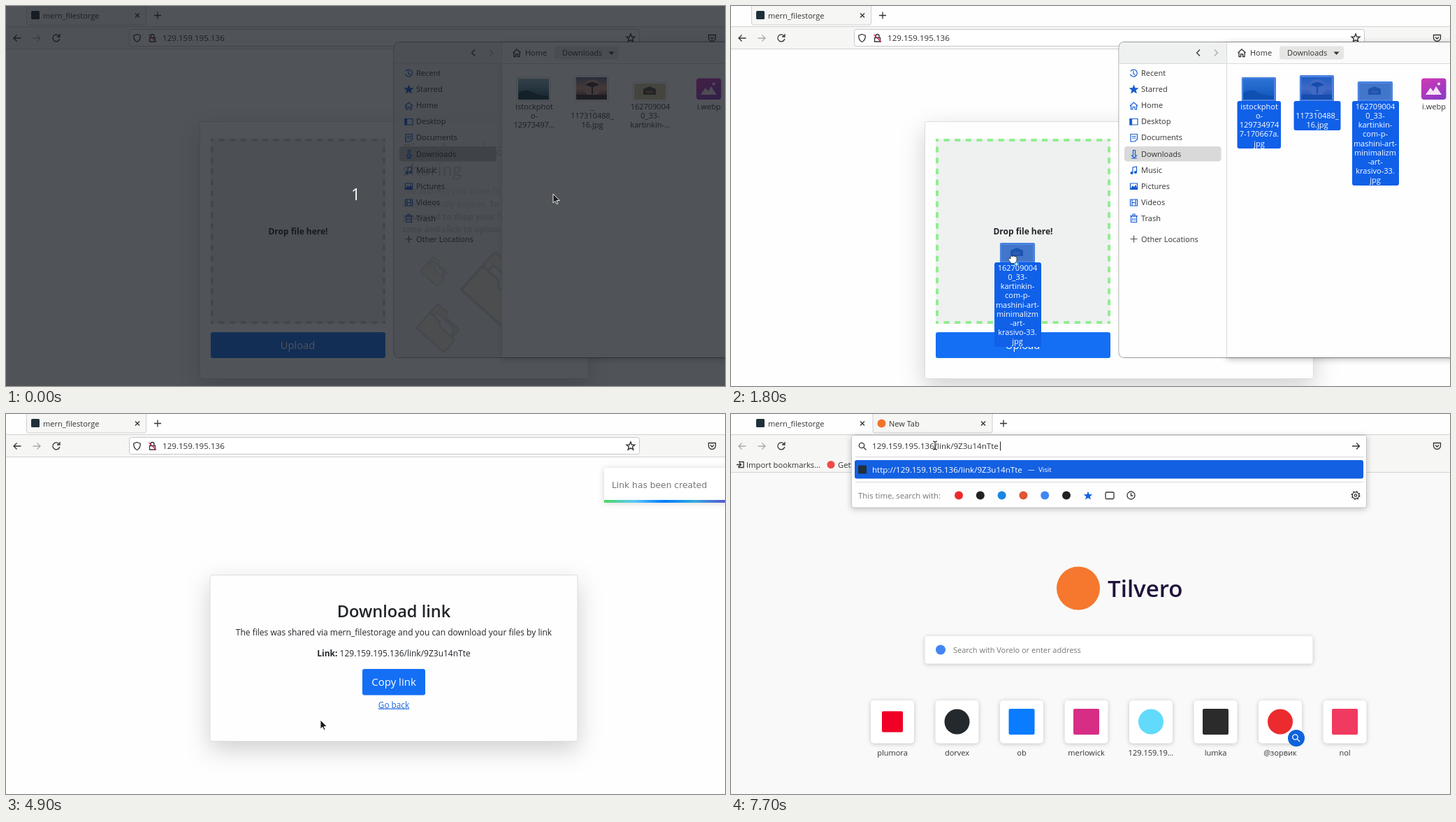
These frames come from a looping animation (1029 px wide and 544 px high, 8000 ms). An HTML page:

```html
<!DOCTYPE html>
<html lang="en">
<head>
<meta charset="utf-8">
<title>File sharing demo</title>
<style>
html, body { margin: 0; width: 100%; height: 100%; overflow: hidden; background: #fefefe; }
svg { display: block; width: 1029px; height: 544px; font: 11px "Open Sans", "Noto Sans", sans-serif; fill: #333; }
text { white-space: pre; }
.m { text-anchor: middle; }
.b { font-weight: 700; }
.w { fill: #fff; }
.body { font-size: 12px; fill: #212529; }
.h { font-size: 23.6px; font-weight: 600; fill: #212529; }
.url { font-size: 11.6px; }
.line { fill: none; stroke: #333; stroke-width: 1.3; }
.pale { stroke: #aaa; }
.blue { fill: none; stroke: #1a5fd0; stroke-width: 1.2; }
.card { fill: #fefefe; stroke: #dcdcdc; filter: drop-shadow(0 12px 17px rgba(0,0,0,.18)); }
.item { fill: #fff; filter: drop-shadow(0 3px 4px rgba(0,0,0,.15)); }
.tile { fill: #fff; filter: drop-shadow(0 1px 3px rgba(0,0,0,.22)); }
.pick { fill: #1060e8; }
.tint { fill: #0a58dc; opacity: .72; }

/* 1.25% is one 100 ms step */
.k { animation: 8s step-end infinite; }
#dim { animation-name: dim; }
@keyframes dim { 0% { opacity: 1 } 1.25% { opacity: .45 } 2.5% { opacity: 0 } }
#s1 { animation-name: s1; }
@keyframes s1 { 0% { opacity: 0 } 7.5% { opacity: 1 } }
#s2 { animation-name: s2; }
@keyframes s2 { 0% { opacity: 0 } 10% { opacity: 1 } }
#s3 { animation-name: s3; }
@keyframes s3 { 0% { opacity: 0 } 13.75% { opacity: 1 } }
#side { animation-name: side; }
@keyframes side { 0% { fill: rgba(234,237,237,.86) } 17.5% { fill: #fefefe } }
#row { animation-name: row; }
@keyframes row { 0% { fill: #bcbebd } 17.5% { fill: #d8d9d8 } }
#dash { animation-name: dash; }
@keyframes dash { 0% { stroke: #ccc } 21.25% { stroke: #90ee90 } 30% { stroke: #ccc } }
#hint { animation-name: hint; }
@keyframes hint { 0% { opacity: 1 } 30% { opacity: 0 } }
#list { animation-name: list; }
@keyframes list { 0% { opacity: 0 } 30% { opacity: 1 } }
#send { animation-name: send; }
@keyframes send { 0% { fill: #146ff4 } 37.5% { fill: #1060d2 } }
#win { animation-name: win; }
@keyframes win { 0% { opacity: 1 } 47.5% { opacity: 0 } }
#home { animation-name: home; }
@keyframes home { 0% { opacity: 1 } 50% { opacity: 0 } }
#load { animation-name: load; }
@keyframes load { 0% { opacity: 0 } 50% { opacity: 1 } 56.25% { opacity: 0 } }
#spin { animation-name: spin; }
@keyframes spin { 0% { transform: rotate(-48deg) } 51.25% { transform: rotate(0) } 52.5% { transform: rotate(48deg) } 53.75% { transform: rotate(96deg) } }
#done { animation-name: done; }
@keyframes done { 0% { opacity: 0 } 56.25% { opacity: 1 } }
#copy { animation-name: copy; }
@keyframes copy { 0% { fill: #146ff4 } 63.75% { fill: #1059c9 } }
#ring { animation-name: ring; }
@keyframes ring { 0% { opacity: 0 } 70% { opacity: 1 } }
#toast { animation-name: toast; }
@keyframes toast {
  0% { transform: translateX(300px) } 57.5% { transform: translateX(170px) }
  58.75% { transform: translateX(60px) } 60% { transform: translateX(-18px) }
  61.25% { transform: translateX(0) } 62.5% { transform: translateX(6px) }
  63.75% { transform: translateX(-3px) } 65% { transform: none }
}
#bar { animation: bar 8s infinite; }
@keyframes bar {
  0%, 56.25% { transform: scaleX(.95); animation-timing-function: steps(35) }
  100% { transform: scaleX(.25) }
}
#fresh { animation-name: fresh; }
@keyframes fresh { 0% { opacity: 0 } 81.25% { opacity: 1 } }
#tiles { animation-name: tiles; }
@keyframes tiles { 0% { opacity: 0 } 82.5% { opacity: 1 } }
#drop { animation-name: drop; }
@keyframes drop { 0% { opacity: 0 } 90% { opacity: 1 } }

#arrow { animation-name: arrow; }
@keyframes arrow {
  0% { opacity: 1 } 17.5% { opacity: 0 } 30% { opacity: 1 } 37.5% { opacity: 0 }
  50% { opacity: 1 } 63.75% { opacity: 0 } 75% { opacity: 1 } 85% { opacity: 0 }
}
#hand { animation-name: hand; }
@keyframes hand { 0% { opacity: 0 } 37.5% { opacity: 1 } 50% { opacity: 0 } 63.75% { opacity: 1 } 75% { opacity: 0 } }
#grab { animation-name: grab; }
@keyframes grab { 0% { opacity: 0 } 17.5% { opacity: 1 } 30% { opacity: 0 } }
#beam { animation-name: beam; }
@keyframes beam { 0% { opacity: 0 } 85% { opacity: 1 } }
#mouse { animation-name: mouse; }
@keyframes mouse {
  0% { transform: translate(783px,269px) }
  5% { transform: translate(776px,235px) }
  6.25% { transform: translate(764px,180px) }
  7.5% { transform: translate(757px,134px) }
  8.75% { transform: translate(790px,128px) }
  10% { transform: translate(832px,124px) }
  11.25% { transform: translate(848px,125px) }
  12.5% { transform: translate(890px,128px) }
  13.75% { transform: translate(915px,131px) }
  17.5% { transform: translate(880px,150px) }
  18.75% { transform: translate(760px,215px) }
  20% { transform: translate(620px,285px) }
  21.25% { transform: translate(480px,345px) }
  22.5% { transform: translate(403px,362px) }
  31.25% { transform: translate(420px,385px) }
  32.5% { transform: translate(480px,430px) }
  33.75% { transform: translate(570px,485px) }
  35% { transform: translate(625px,507px) }
  36.25% { transform: translate(590px,502px) }
  37.5% { transform: translate(520px,497px) }
  38.75% { transform: translate(450px,494px) }
  40% { transform: translate(414px,493px) }
  42.5% { transform: translate(343px,493px) }
  57.5% { transform: translate(350px,490px) }
  58.75% { transform: translate(375px,478px) }
  60% { transform: translate(410px,460px) }
  61.25% { transform: translate(450px,438px) }
  62.5% { transform: translate(490px,415px) }
  63.75% { transform: translate(520px,398px) }
  65% { transform: translate(538px,390px) }
  66.25% { transform: translate(545px,386px) }
  67.5% { transform: translate(550px,382px) }
  75% { transform: translate(470px,310px) }
  76.25% { transform: translate(370px,210px) }
  77.5% { transform: translate(288px,122px) }
  78.75% { transform: translate(225px,30px) }
  80% { transform: translate(217px,15px) }
  83.75% { transform: translate(222px,22px) }
  85% { transform: translate(235px,34px) }
  86.25% { transform: translate(247px,42px) }
  87.5% { transform: translate(255px,46px) }
  96.25% { transform: translate(292px,45px) }
}
</style>
</head>
<body>
<svg viewBox="0 0 1029 544">
<defs>
  <linearGradient id="rainbow">
    <stop stop-color="#4cd964"/><stop offset=".2" stop-color="#5ac8fa"/><stop offset=".4" stop-color="#007aff"/>
    <stop offset=".6" stop-color="#34aadc"/><stop offset=".8" stop-color="#5856d6"/><stop offset="1" stop-color="#ff2d55"/>
  </linearGradient>
  <linearGradient id="sea" x2="0" y2="1"><stop stop-color="#8fb6c6"/><stop offset=".45" stop-color="#5d8fa0"/><stop offset="1" stop-color="#1f4a5c"/></linearGradient>
  <linearGradient id="dusk" x2="0" y2="1"><stop stop-color="#5d6d88"/><stop offset=".5" stop-color="#d59a86"/><stop offset="1" stop-color="#35303c"/></linearGradient>
  <linearGradient id="pink" x2=".6" y2="1"><stop stop-color="#d338b4"/><stop offset="1" stop-color="#8e3cc4"/></linearGradient>
  <g id="t1"><path fill="#fff" stroke="#bbb" stroke-width=".6" d="M731 102h48v34h-48z"/><path fill="url(#sea)" d="M733 104h44v30h-44z"/><path fill="#1e3f4a" d="M733 124q12-6 20-1t24 6v5h-44z"/></g>
  <g id="t2"><path fill="#fff" stroke="#bbb" stroke-width=".6" d="M814 100h48v36h-48z"/><path fill="url(#dusk)" d="M816 102h44v32h-44z"/><circle cx="839" cy="117" r="12" fill="#c9978a"/><path fill="#3c3038" d="M829 113q10-8 20 0l-9 3v10h-2v-10zM816 127h44v7h-44z"/></g>
  <g id="t3"><path fill="#fff" stroke="#ccc" stroke-width=".6" d="M897 109h49v27h-49z"/><path fill="#d3c7a0" d="M899 111h45v23h-45z"/><path fill="#4a4a44" d="M912 119l9-4 9 4v8h-18z"/><path fill="#a0603c" d="M916 121h10v4h-10z"/></g>
  <g id="p3">
    <use href="#t3"/><rect class="tint" x="897" y="108" width="50" height="29" rx="2"/>
    <rect class="pick" x="889" y="136" width="67" height="121" rx="3"/>
    <text class="m w" x="922" y="148" data-lines="162709004|0_33-|kartinkin-|com-p-|mashini-art-|minimalizm|-art-|krasivo-33.|jpg"/>
  </g>
  <g id="folder" stroke="#2b2b2b" stroke-width="1.3" stroke-linejoin="round">
    <path fill="#f2a93b" d="M1 28V3q0-2 2-2h8l3 4h13q2 0 2 2v21z"/>
    <path fill="#fff" d="M5 13V7h19l3 4v4z"/>
    <path fill="#fcd061" d="M1 28V13q0-2 2-2h9l3 3h14q3 0 3 2v10q0 2-2 2z"/>
  </g>
  <g id="reload"><path class="line" d="M76 43a5 5 0 1 0 .8 4M77 40v4h-4"/></g>
  <g id="pocket"><path class="line" d="M1005.500 41.500h10v4a5 5 0 0 1-10 0zM1008 44.500l2.500 2.500 2.500-2.500"/></g>
  <g id="x"><path class="line" stroke-width="1" d="M-3-3 3 3M3-3-3 3"/></g>
  <g id="plus"><path class="line" stroke-width="1" d="M-5 0H5M0-5V5"/></g>
  <g id="lens"><circle class="line" cx="-1" cy="-1" r="3.700"/><path class="line" d="M2 2 5.500 5.500"/></g>
  <path id="star" d="M0-5.500 1.500-1.800 5.400-1.600 2.400.9 3.400 4.700 0 2.500-3.400 4.700-2.400.9-5.400-1.600-1.500-1.800Z"/>
  <rect id="fav" x="-6" y="-6" width="12" height="12" rx="1.500" fill="#20303a"/>
</defs>

<path fill="#fefefe" d="M0 0h1029v544H0z"/>

<g id="home" class="k">
  <rect class="card" x="277.500" y="165.500" width="556" height="368" rx="3"/>
  <text class="h" x="567" y="214" data-lines="Simple, private file|sharing" data-step="29"/>
  <g class="body">
    <text x="567" y="269">The app lets you share files with a link that</text>
    <text x="567" y="287.500">automatically expires. <tspan class="b">To upload files</tspan></text>
    <text class="b" x="567" y="305.500" data-lines="you need to drop your files to the drop|zone and click to upload button" data-step="18.500"/>
  </g>
  <use href="#folder" transform="translate(612 357) rotate(42) scale(1.050)"/>
  <use href="#folder" transform="translate(700 348) rotate(42) scale(2.700)"/>
  <use href="#folder" transform="translate(618 424) rotate(42) scale(1.700)"/>
  <rect x="293" y="190" width="250" height="265" rx="4" fill="#eff1f0"/>
  <path id="dash" class="k" fill="none" stroke-width="4" stroke-dasharray="8 7.610" stroke-dashoffset="4" d="M293 192H543M293 453H543M295 190V455M541 190V455"/>
  <text id="hint" class="k body m b" x="418" y="326.500">Drop file here!</text>
  <g id="list" class="k body">
    <rect class="item" x="308" y="206" width="219" height="67.500" rx="3"/>
    <rect class="item" x="308" y="280" width="219" height="49" rx="3"/>
    <rect class="item" x="308" y="335" width="219" height="86.500" rx="3"/>
    <use href="#folder" x="317" y="225"/><use href="#folder" x="317" y="290"/><use href="#folder" x="317" y="364"/>
    <text x="351" y="225.500" data-lines="istockphoto-|1297349747-170667a.jpg" data-step="18.500"/>
    <text class="b" x="351" y="262.500">119735 bytes</text>
    <text x="351" y="299.500">_117310488_16.jpg</text>
    <text class="b" x="351" y="318">116165 bytes</text>
    <text x="351" y="355" data-lines="1627090040_33-kartinkin-|com-p-mashini-art-|minimalizm-art-krasivo-33.jpg" data-step="18.500"/>
    <text class="b" x="351" y="410.500">127760 bytes</text>
  </g>
  <rect id="send" class="k" x="293" y="467" width="250" height="37" rx="3"/>
  <text class="m w" x="417.500" y="491" font-size="14.700">Upload</text>
</g>

<g id="load" class="k">
  <g transform="translate(554.500 350)"><path id="spin" class="k" fill="none" stroke="#2b2d30" stroke-width="3" d="M7.800-7.800A11 11 0 1 0 7.800 7.800"/></g>
</g>

<g id="done" class="k">
  <rect class="card" x="292" y="230.500" width="526" height="238" rx="3"/>
  <text class="h m" x="555" y="291">Download link</text>
  <text class="body m" x="555" y="316.500">The files was shared via mern_filestorage and you can download your files by link</text>
  <text class="body m" x="555" y="347"><tspan class="b">Link:</tspan> 129.159.195.136/link/9Z3u14nTte</text>
  <rect id="ring" class="k" x="507" y="362" width="96" height="43.500" rx="5" fill="#b6d4fb"/>
  <rect id="copy" class="k" x="510" y="365" width="90" height="37.500" rx="3"/>
  <text class="m w" x="555" y="389" font-size="15">Copy link</text>
  <text class="m" x="555" y="420.500" font-size="11.800" fill="#1a66dc" text-decoration="underline">Go back</text>
  <g id="toast" class="k">
    <rect x="856" y="77" width="248" height="49" fill="#fff" style="filter:drop-shadow(0 1px 4px rgba(0,0,0,.18))"/>
    <text x="867" y="106" fill="#757575" style="font:12.300px 'DejaVu Sans',sans-serif">Link has been created</text>
    <g transform="translate(856 122.500)"><rect id="bar" width="248" height="4" fill="url(#rainbow)"/></g>
  </g>
</g>

<g id="chrome">
  <path fill="#fefefe" d="M0 0h1029v30H0z"/>
  <path fill="#f6f6f5" d="M0 30h1029v31H0z"/>
  <path stroke="#d2d2d2" d="M0 29.500h1029M0 61.500h1029"/>
  <path fill="#f6f6f5" stroke="#c4c4c4" stroke-width=".8" d="M29.500-1h171v25q0 3-3 3h-165q-3 0-3-3z"/>
  <use href="#fav" x="42" y="13"/>
  <text x="53" y="17.500">mern_filestorge</text>
  <use href="#x" x="188" y="13.500"/><use href="#plus" x="217" y="13.500"/>
  <path class="line" d="M21.500 46H11M15.500 41.500 11 46l4.500 4.500"/>
  <path class="line pale" d="M38.500 46H49M44.500 41.500 49 46l-4.500 4.500"/>
  <use href="#reload"/><use href="#pocket"/>
  <rect x="176.500" y="33.500" width="730" height="24" rx="3" fill="#fff" stroke="#c8c8c8"/>
  <path class="line" d="M187.500 40.500l4.700 1.700q.6 6.500-4.700 9.300-5.300-2.800-4.700-9.300z"/>
  <path class="line" d="M205.500 45.500h8v5.500h-8zM207 45v-2a2.500 2.500 0 0 1 5 0v2"/>
  <path stroke="#d6204e" stroke-width="1.300" d="M204.500 41l10.500 10.500"/>
  <text class="url" x="224" y="50">129.159.195.136</text>
  <use href="#star" class="line" transform="translate(894 46) scale(1.100)"/>
</g>

<g id="win" class="k">
  <path fill="none" stroke="#9a9a9a" d="M1040 51.500H563q-8 0-8 8v436q0 8 8 8h477" />
  <path fill="#fefefe" d="M709.500 52H1040v451H709.500z" style="filter:drop-shadow(0 2px 5px rgba(0,0,0,.3))"/>
  <path id="side" class="k" d="M555.500 82H709.500V503H563q-7.500 0-7.500-8z"/>
  <path fill="#eff0f0" d="M709.500 52H563q-7.500 0-7.500 8v22h154z"/>
  <path fill="#fbfbfb" d="M710 52h330v30H710z"/>
  <path stroke="#d9d9d9" d="M555 82.500h474M709.500 52v451"/>
  <path class="line" d="M671 62.500l-4.500 4.500 4.500 4.500"/><path class="line pale" d="M692 62.500l4.500 4.500-4.500 4.500"/>
  <path class="line" d="M725.500 67l5.500-5 5.500 5M727 66v6.500h2.500V69h3v3.500h2.500V66"/>
  <text x="743" y="71">Home</text>
  <rect x="785" y="57.500" width="92" height="19" rx="4" fill="#e5e5e4"/>
  <text x="796" y="71">Downloads</text><path d="M862.500 65.500h8l-4 4.500z"/>
  <rect id="row" class="k" x="563" y="201" width="138.500" height="21.500" rx="4"/>
  <text x="587" y="100" data-lines="Recent|Starred|Home|Desktop|Documents|Downloads|Music|Pictures|Videos|Trash" data-step="23.110"/>
  <text x="587" y="337.500">Other Locations</text>
  <g class="blue">
    <path d="M572 93.500a5 5 0 1 1-.5 4M576 93v4l2.500 1.500"/>
    <use href="#star" x="576.500" y="119.500" fill="#1a5fd0"/>
    <path d="M571 143l5.500-5 5.500 5M572.500 142v6h2.500v-3.500h3v3.500h2.500v-6"/>
    <path d="M571 161.500h11v8.500h-11z"/><path fill="#1a5fd0" d="M571 161.500h2.500v8.500H571z"/>
    <path d="M572 183.500h9.500v7l-3.500 3.500h-6zM574 186.500h5.500M574 189h5.500"/>
    <path d="M575.500 206.500v7.500h-2l3.500 3.500 3.500-3.500h-2v-7.500zM573 218h8"/>
    <path d="M575 239v-8l5.500-1v8"/><g fill="#1a5fd0"><circle cx="573.500" cy="239" r="1.500"/><circle cx="579" cy="238" r="1.500"/></g>
    <path d="M571.500 254h10v8.500h-10z"/><path fill="#1a5fd0" d="M572 262l3-4 2 2 2-3 2 5z"/>
    <path d="M571.500 277h10v9h-10zM574 277v9M579 277v9M574 281.500h5"/>
    <path d="M572.500 301h8v8.500h-8zM571 300.500h11M575 300v-2h3v2M575 303.500v4M578 303.500v4"/>
    <path stroke="#555" d="M571.500 333.500h10M576.500 328.500v10"/>
  </g>
  <use href="#t1"/><use href="#t2"/><use href="#t3"/>
  <g class="m">
    <text x="756" y="148" data-lines="istockphot|o-|12973497…"/>
    <text x="839" y="148" data-lines="_|117310488_|16.jpg"/>
    <text x="922" y="148" data-lines="162709004|0_33-|kartinkin-…"/>
    <text x="1006" y="148">i.webp</text>
  </g>
  <rect x="988" y="103.500" width="35.500" height="30.500" rx="4" fill="url(#pink)"/>
  <path fill="#f7e4f6" d="M994 127l7-10 4 5 4-7 8 12z"/><circle cx="1013" cy="111.500" r="2" fill="#f7e4f6"/>
  <g id="s1" class="k">
    <rect class="tint" x="731" y="102" width="49" height="35" rx="2"/>
    <rect class="pick" x="724.500" y="136" width="62.500" height="68" rx="3"/>
    <text class="m w" x="756" y="148" data-lines="istockphot|o-|129734974|7-170667a.|jpg"/>
  </g>
  <g id="s2" class="k">
    <rect class="tint" x="814" y="99" width="49" height="38" rx="2"/>
    <rect class="pick" x="805.500" y="136" width="67" height="42" rx="3"/>
    <text class="m w" x="839" y="148" data-lines="_|117310488_|16.jpg"/>
  </g>
  <g id="s3" class="k"><use href="#p3"/></g>
</g>

<g id="fresh" class="k">
  <path fill="#fefefe" d="M0 0h1029v30H0z"/>
  <path fill="#f6f6f5" d="M0 30h1029v53H0z"/>
  <path fill="#f8f9f8" d="M0 83h1029v461H0z"/>
  <path stroke="#d2d2d2" d="M0 29.500h1029M0 83.500h1029"/>
  <path fill="#f6f6f5" stroke="#c4c4c4" stroke-width=".8" d="M203-1h171v25q0 3-3 3h-165q-3 0-3-3z"/>
  <use href="#fav" x="42" y="13"/><text x="53" y="17.500">mern_filestorge</text>
  <circle cx="215.500" cy="13.500" r="6" fill="#f2742c"/><text x="226" y="17.500">New Tab</text>
  <use href="#x" x="188" y="13.500"/><use href="#x" x="361" y="13.500"/><use href="#plus" x="390" y="13.500"/>
  <path class="line pale" d="M21.500 46H11M15.500 41.500 11 46l4.500 4.500M38.500 46H49M44.500 41.500 49 46l-4.500 4.500"/>
  <use href="#reload"/><use href="#pocket"/>
  <path class="line" d="M11 68.500h7v8h-7v-2.500M8 72.500h6.500M12 70l2.500 2.500L12 75"/>
  <text x="22" y="76.500" font-size="11.200">Import bookmarks…</text>
  <circle cx="143" cy="72.500" r="5.500" fill="#ee4a45"/><text x="153" y="76.500" font-size="11.200">Getting Started</text>
  <rect x="176.500" y="33.500" width="730" height="24" rx="3" fill="#fff" stroke="#1a66dc"/>
  <use href="#lens" x="188" y="46"/>
  <text x="202" y="50" fill="#777">Search with Vorelo or enter address</text>
  <g id="tiles" class="k">
    <circle cx="497" cy="249.500" r="31" fill="#f5782e"/>
    <text x="539" y="261.500" font-size="33" font-weight="600" fill="#20123a">Tilvero</text>
    <rect class="tile" x="277.500" y="318" width="555" height="39.500" rx="4"/>
    <circle cx="300" cy="337.500" r="7" fill="#4285f4"/>
    <text x="318" y="341.500" fill="#777">Search with Vorelo or enter address</text>
    <g id="grid"></g>
    <circle cx="809" cy="464" r="12" fill="#0f62dc"/>
    <g style="filter:brightness(0) invert(1)"><use href="#lens" x="808.500" y="463.500"/></g>
  </g>
  <g id="drop" class="k">
    <rect x="172.500" y="30.500" width="737" height="103.500" rx="3" fill="#fefefe" stroke="#c8c8c8" style="filter:drop-shadow(0 2px 4px rgba(0,0,0,.22))"/>
    <use href="#lens" x="188" y="46"/>
    <text class="url" x="202" y="50">129.159.195.136/link/9Z3u14nTte</text>
    <path stroke="#222" d="M385.500 39.500v13"/>
    <path class="line" d="M889 46h10M895 41.500l4.500 4.500-4.500 4.500"/>
    <path stroke="#d8d8d8" d="M178 61.500h727M178 97.500h727"/>
    <rect x="177" y="66" width="728" height="26.500" rx="3" fill="#1360e2"/>
    <use href="#fav" x="188" y="79.500"/>
    <text class="url w" x="202" y="83.500">http://129.159.195.136/link/9Z3u14nTte</text>
    <text class="w" x="425" y="83" font-size="9.800">—  Visit</text>
    <text x="182" y="121" font-size="11.400" fill="#777">This time, search with:</text>
    <g id="engines"></g>
    <use href="#star" transform="translate(511 117) scale(1.150)" fill="#1360e2"/>
    <rect class="line" x="536" y="112" width="12" height="9.500" rx="1.500"/>
    <circle class="line" cx="572.500" cy="116.500" r="5.500"/><path class="line" d="M572.500 113v4h3"/>
    <circle class="line" cx="894" cy="116.500" r="4.700"/><circle class="line" cx="894" cy="116.500" r="1.700"/>
    <circle cx="894" cy="116.500" r="5.800" fill="none" stroke="#333" stroke-width="1.400" stroke-dasharray="2 2.555"/>
  </g>
</g>

<g id="dim" class="k">
  <path fill="#14181e" opacity=".74" d="M0 0h1029v544H0z"/>
  <text class="m w" x="500.500" y="277.500" font-size="23">1</text>
</g>

<g id="mouse" class="k">
  <path id="arrow" class="k" fill="#1c1c1c" stroke="#fff" stroke-width=".9" d="M0 0V13L3 10.200 5 14.600 7 13.700 5 9.500H9.300Z"/>
  <path id="hand" class="k" fill="#fff" stroke="#1c1c1c" d="M.5 0Q.5-1.500 2-1.500T3.500 0V4.500L8 5.500Q9.500 6 9.300 8L8.500 12H1L-2.600 7.500Q-3 5.500-1.300 6L.5 7.500Z"/>
  <g id="grab" class="k">
    <use href="#p3" x="-915" y="-131"/>
    <path fill="#fff" stroke="#1c1c1c" stroke-width=".8" d="M-3-3q1.500-2 3-.5 1.500-1.500 3 0 3-1 3 2v4l-2 4h-6l-3-4q-2-2.500 0-3.500l2 1z"/>
    <circle cx="5.500" cy="7.500" r="3.500" fill="#3d9be9"/><path stroke="#fff" d="M3.500 7.500h4M5.500 5.500v4"/>
  </g>
  <path id="beam" class="k" fill="none" stroke="#222" stroke-width="1.100" d="M-3-6q3 0 3 2v8q0 2-3 2M3-6q-3 0-3 2v8q0 2 3 2"/>
</g>
</svg>
<script>
const $ = id => document.getElementById(id);

// Break labels into lines at "|"
for (const el of document.querySelectorAll('[data-lines]')) {
  const step = el.dataset.step || 13.15;
  el.innerHTML = el.dataset.lines.split('|').map((s, i) =>
    `<tspan x="${el.getAttribute('x')}" dy="${i ? step : 0}">${s}</tspan>`).join('');
}

const sites = [
  ['plumora', '#f00024', 30], ['dorvex', '#24292e', 0], ['ob', '#0a7cff', 37], ['merlowick', '#d62e85', 37],
  ['129.159.19…', '#61dafb', 0], ['lumka', '#2b2b2b', 37], ['@зорвик', '#ec2b2f', 0], ['nol', '#f03a5f', 37]
];
$('grid').innerHTML = sites.map(([name, color, size], i) => {
  const x = 231 + 92.5 * i, y = 440.5;
  const mark = size
    ? `<rect x="${x - size / 2}" y="${y - size / 2}" width="${size}" height="${size}" rx="2" fill="${color}"/>`
    : `<circle cx="${x}" cy="${y}" r="18" fill="${color}"/>`;
  return `<rect class="tile" x="${x - 31}" y="410" width="62" height="61.5" rx="5"/>${mark}
    <text class="m" x="${x}" y="488.5">${name}</text>`;
}).join('');

$('engines').innerHTML = ['#ec2b2f', '#222', '#1a85e0', '#de5833', '#4285f4', '#222'].map((color, i) =>
  `<circle cx="${326 + 30.8 * i}" cy="116.5" r="6" fill="${color}"/>`).join('');
</script>
</body>
</html>
```
